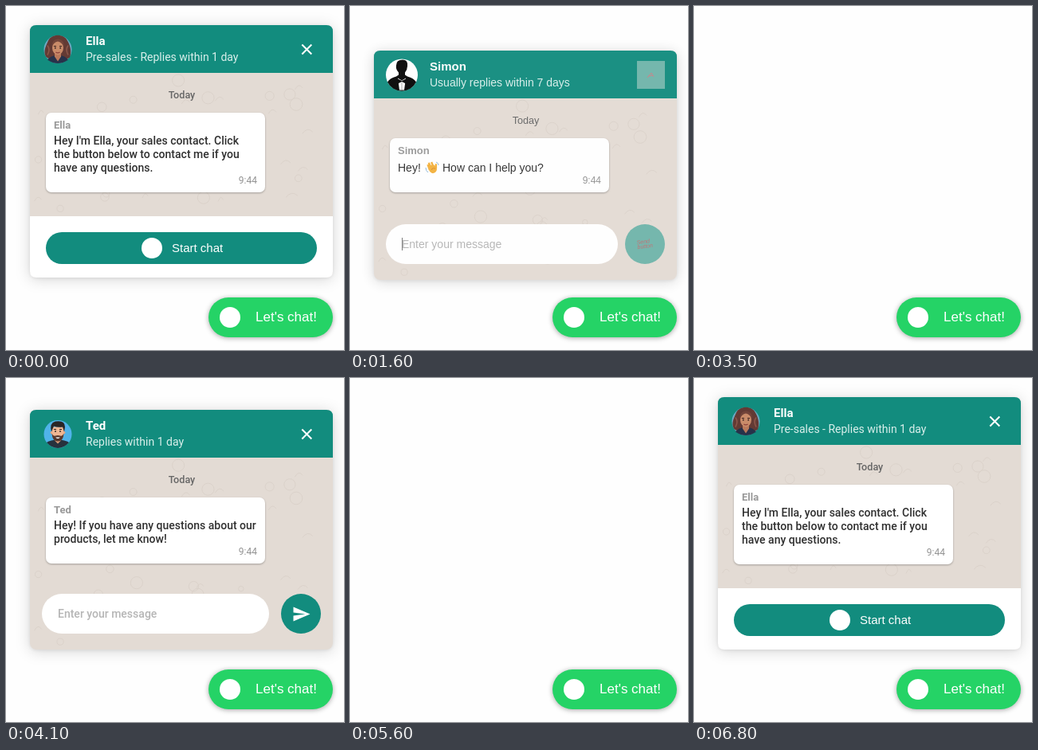
Recreate the animation shown at these times as an HTML page. Size 424x432 px, loop 7.2 s.

```html
<!DOCTYPE html>
<html lang="en">
<head>
<meta charset="utf-8">
<title>Chat widget</title>
<style>
html, body { margin: 0; width: 100%; height: 100%; overflow: hidden; background: #fefefe; }
svg { display: block; width: 100vw; height: 100vh; }
text { font-family: Roboto, sans-serif; white-space: pre; }
.plain text, .arial { font-family: "Liberation Sans", Arial, sans-serif; }
.plain .body { font-weight: 400; }
.panel { filter: drop-shadow(0 1px 2px rgba(0,0,0,.08)) drop-shadow(0 2px 9px rgba(0,0,0,.16)); }
.bubble { filter: drop-shadow(0 1px 1px rgba(0,0,0,.28)); }
.fab { filter: drop-shadow(0 1px 3px rgba(0,0,0,.35)); }
</style>
</head>
<body>
<svg id="stage" viewBox="0 0 424 432" xmlns="http://www.w3.org/2000/svg"></svg>
<script>
const LOOP = 7200, STEP = 100, BOTTOM = 341;
const TEAL = '#128c7e', PALE = '#70b5aa';

const rect = (x, y, w, h, r, fill, more = '') =>
  `<rect x="${x}" y="${y}" width="${w}" height="${h}" rx="${r}" fill="${fill}" ${more}/>`;
const circle = (x, y, r, fill, more = '') =>
  `<circle cx="${x}" cy="${y}" r="${r}" fill="${fill}" ${more}/>`;
const oval = (x, y, rx, ry, fill, more = '') =>
  `<ellipse cx="${x}" cy="${y}" rx="${rx}" ry="${ry}" fill="${fill}" ${more}/>`;
const path = (d, fill, more = '') => `<path d="${d}" fill="${fill}" ${more}/>`;
const line = (d, color, w) => path(d, 'none', `stroke="${color}" stroke-width="${w}"`);
const label = (x, y, size, weight, fill, s, more = '') =>
  `<text x="${x}" y="${y}" font-size="${size}" font-weight="${weight}" fill="${fill}" ${more}>${s}</text>`;
const at = (x, y, s) => `<g transform="translate(${x} ${y})">${s}</g>`;

// Avatars are drawn around 0,0.
const faces = {
  woman: () => circle(0, 0, 17.5, '#6fa9c4') +
    path('M-15 9C-19 2-14-6-12-11C-8-20 8-20 12-11C15-6 18 2 15 10C10 15-10 15-15 9Z', '#633a34') +
    line('M-13-5Q-9 0-13 7M13-5Q9 0 13 7', '#8b5649', 1.6) +
    path('M-13 13Q-8 7 0 8Q8 7 13 13Q0 22-13 13Z', '#27324a') +
    path('M-4 5H4V9L0 15L-4 9Z', '#b9785a') +
    oval(0, -2, 7, 9, '#c98b69') +
    path('M-8-3Q-7-14 1-13Q8-12 8-3Q5-9 0-10Q-5-9-8-3Z', '#72443a') +
    line('M-5-4H-2M2-4H5', '#3a211e', 1.2) +
    circle(-3.2, -1.8, .9, '#2b1a1a') + circle(3.2, -1.8, .9, '#2b1a1a') +
    line('M-2.6 3.6Q0 5.2 2.6 3.6', '#8c3f3a', 1.2),
  suit: () => circle(0, 0, 20, '#fff') +
    path('M-18 9Q-15 4-7 2L-4 0V-3Q-8-7-7-12Q-7-19 1-19Q8-19 7-11Q7-7 4-3V0L7 2Q15 4 18 9A20 20 0 0 1-18 9Z', '#070707') +
    path('M-5 4L0 7L5 4L3 19H-3Z', '#fff') +
    path('M-5 5L0 7.5L5 5V11L0 8.5L-5 11Z', '#070707') +
    path('M-.5 9H.5V19H-.5Z', '#aaa'),
  man: () => circle(0, 0, 17.5, '#50b3ea') +
    path('M-14 10.5Q-9 7 0 7Q9 7 14 10.5Q8 17.5 0 17.5Q-8 17.5-14 10.5Z', '#27313d') +
    path('M-4 3H4V8L0 12L-4 8Z', '#d99a76') +
    circle(-7.6, -2, 1.8, '#e2a582') + circle(7.6, -2, 1.8, '#e2a582') +
    path('M-7.5-9H7.5V0Q6 8 0 8Q-6 8-7.5 0Z', '#efb693') +
    path('M-7.5-1Q-6 3-3 2Q0 1 3 2Q6 3 7.5-1Q7 9 0 9Q-7 9-7.5-1Z', '#58382e') +
    path('M-8-3Q-11-14-3-16Q9-18 9-9L8-3L6-9Q0-8-5-10Z', '#2a2525') +
    circle(-3, -3.5, .9, '#222') + circle(3, -3.5, .9, '#222') +
    line('M-5-6H-2M2-6H5', '#2a2525', 1.2) +
    path('M-2.8 4H2.8Q0 7-2.8 4Z', '#fff')
};

const chats = [
  { open: 5700, life: 3000, top: 24, high: 100, first: 40, name: 'Ella', face: 'woman', start: true,
    note: 'Pre-sales - Replies within 1 day',
    lines: ["Hey I'm Ella, your sales contact. Click", 'the button below to contact me if you', 'have any questions.'] },
  { open: 1600, life: 1900, top: 53, high: 68, first: 42, name: 'Simon', face: 'suit', wave: true,
    note: 'Usually replies within 7 days', lines: ['Hey!'] },
  { open: 3600, life: 2000, top: 40, high: 83, first: 40, name: 'Ted', face: 'man',
    note: 'Replies within 1 day',
    lines: ['Hey! If you have any questions about our', 'products, let me know!'] }
];

// Faint doodles on the wallpaper
function doodles(top, bottom) {
  let seed = 7, s = '';
  const rnd = () => (seed = seed * 16807 % 2147483647) / 2147483647;
  for (let i = 0; i < 46; i++) {
    const x = 40 + rnd() * 360, y = top + 9 + rnd() * (bottom - top - 18), r = 3 + rnd() * 5;
    s += i % 2 ? `M${x - r} ${y}a${r} ${r} 0 1 1 ${r * 2} 0a${r} ${r} 0 1 1 ${-r * 2} 0`
               : `M${x - r} ${y + 3}q${r}-9 ${r * 2}-2`;
  }
  return line(s, '#dad1c9', .9);
}

const hand = (x, y) => at(x, y, `<g transform="rotate(-28)">` +
  line('M-4 1L-3-6M-1-1V-7.5M2-1L2.5-6.5M4 3L6.5-2', '#f3b13e', 2.4) +
  oval(0, 2, 5, 5.2, '#f3b13e') + line('M-2 2Q1 0 3 3', '#d98a2b', .9) + '</g>' +
  line('M-8 0Q-8 4-5 6M5-7Q8-6 8-3', '#8fb7d6', 1));

function header(c, ready) {
  const y = c.top;
  return path(`M30 ${y + 60}V${y + 8}q0-8 8-8H402q8 0 8 8V${y + 60}Z`, TEAL) +
    at(65, y + 30.5, faces[c.face]()) +
    label(100, y + 25, 15, 700, '#fff', c.name) +
    label(100, y + 45, 14, 400, '#d9efeb', c.note) +
    (ready ? line(`M371.3 ${y + 24.5}l12 12m0-12l-12 12`, '#fff', 2)
           : rect(360, y + 13, 35, 35, 0, PALE) +
             line(`M373 ${y + 34}l5-6l3 5m-7-1l6-1`, '#c58388', 1));
}

function bubble(c, ready) {
  const y = c.top + 110, end = y + c.high;
  let s = rect(50, y, 275, c.high, 7, '#fff', 'class="bubble"') +
    label(60, y + 20, 13, 700, '#999', c.name) +
    label(315, end - 11, 12, 400, '#929292', '9:44', 'text-anchor="end"');
  c.lines.forEach((t, i) => s += label(60, y + c.first + i * 17, 14, 500, '#303030', t, 'class="body"'));
  if (c.wave) {
    s += hand(ready ? 102 : 103, y + 37) +
      label(ready ? 114 : 116, y + c.first, 14, 500, '#303030', 'How can I help you?', 'class="body"');
  }
  return s;
}

const startBar = () => path('M30 264H410V333q0 8-8 8H38q-8 0-8-8Z', '#fff') +
  rect(50, 284, 340, 40, 20, TEAL) + circle(183, 304, 13, '#fff') +
  label(208, 308.5, 15, 400, '#fff', 'Start chat', 'class="arial"');

const inputBar = ready => rect(45, 271, ready ? 285 : 291, 50, 25, '#fff') +
  label(65, 301, 14, 500, '#b5b5b5', 'Enter your message', 'class="body"') +
  circle(370, 296, 25, ready ? TEAL : PALE) +
  (ready ? at(358.5, 284.5, path('M2 21L23 12L2 3V10L17 12L2 14Z', '#fff'))
         : line('M65.5 288v16', '#777', 1) +
           `<g transform="rotate(-8 370 296)" font-style="italic">` +
           label(360, 295, 7, 400, '#c06d72', 'Send') + label(360, 301, 7, 400, '#c06d72', 'button') + '</g>');

function panel(c, ready) {
  const floor = c.start ? 264 : BOTTOM;
  return `<g class="${ready ? '' : 'plain'}" display="none" opacity="${ready ? 1 : .96}">` +
    rect(30, c.top, 380, BOTTOM - c.top, 8, '#e3dbd4', 'class="panel"') +
    doodles(c.top + 60, floor) + header(c, ready) +
    label(220.5, c.top + 92, 12.6, 500, '#666', 'Today', 'text-anchor="middle" class="body"') +
    bubble(c, ready) + (c.start ? startBar() : inputBar(ready)) + '</g>';
}

const stage = document.getElementById('stage');
stage.innerHTML = rect(0, 0, 424, 432, 0, '#fefefe') +
  '<g id="panels">' + chats.map(c => panel(c, false) + panel(c, true)).join('') + '</g>' +
  rect(254, 366, 156, 50, 25, '#25d366', 'class="fab"') + circle(281, 391, 13, '#fff') +
  label(313, 396, 17, 400, '#fff', "Let's chat!", 'class="arial"');
const groups = document.getElementById('panels').children;

function draw(now) {
  const t = Math.floor(now % LOOP / STEP) * STEP;
  chats.forEach((c, i) => {
    const age = (t - c.open + LOOP) % LOOP, shown = age < c.life;
    const left = Math.max(0, 1 - age / 200);
    [age < STEP, age >= STEP].forEach((on, k) => {
      const g = groups[i * 2 + k];
      g.setAttribute('display', shown && on ? 'inline' : 'none');
      g.setAttribute('transform', `translate(0 ${3 * left * left})`);
    });
  });
}

const began = performance.now();
function tick() {
  draw(performance.now() - began);
  requestAnimationFrame(tick);
}
tick();
</script>
</body>
</html>
```
